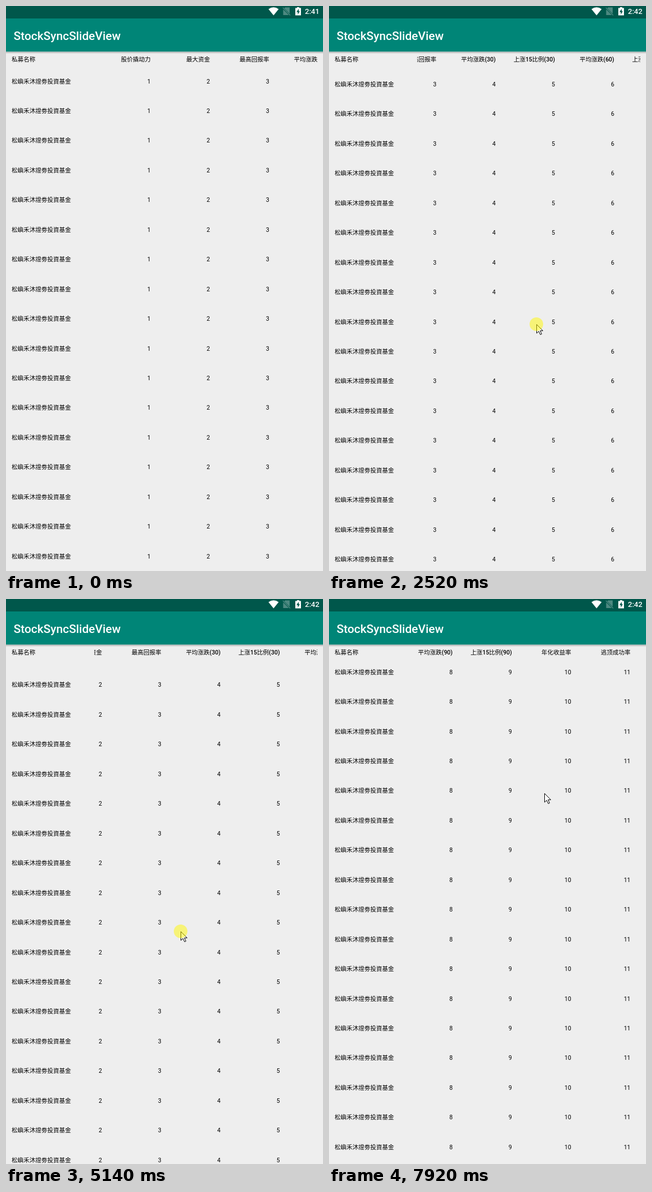
These frames come from a looping animation (561x998 px, 7990 ms). An HTML page:

```html
<!DOCTYPE html>
<html lang="zh-CN">
<head>
<meta charset="utf-8">
<title>StockSyncSlideView</title>
<style>
  html, body { margin: 0; width: 100%; height: 100%; overflow: hidden; background: #eee; }
  svg { display: block; width: 100%; height: 100%; }
  text { font: 10.5px Roboto, "Noto Sans CJK SC", sans-serif; fill: #000; }
  .label { font-weight: 500; }
  .end { text-anchor: end; }
  .title { font-size: 20.8px; font-weight: 500; fill: #fff; }
  .clock { font-size: 13px; font-weight: 500; fill: #fff; }
</style>
</head>
<body>
<svg viewBox="0 0 561 998">
  <defs>
    <linearGradient id="shade" x2="0" y2="1">
      <stop offset="0" stop-opacity=".28"/>
      <stop offset="1" stop-opacity="0"/>
    </linearGradient>
    <clipPath id="listClip"><rect y="106" width="561" height="892"/></clipPath>
    <clipPath id="slideClip"><rect x="156" y="82" width="395" height="916"/></clipPath>
  </defs>
  <rect width="561" height="998" fill="#eee"/>

  <text class="label" x="10" y="98">私募名称</text>
  <g clip-path="url(#slideClip)">
    <g id="heads"></g>
    <g clip-path="url(#listClip)"><g id="cells"></g></g>
  </g>
  <g clip-path="url(#listClip)"><g id="names"></g></g>

  <rect y="80.500" width="561" height="4" fill="url(#shade)"/>
  <rect y="22" width="561" height="58.500" fill="#008577"/>
  <rect width="561" height="22" fill="#00574b"/>
  <text class="title" x="13.500" y="60">StockSyncSlideView</text>
  <path d="M464.5 5.5Q473.5 -1 482.5 5.5L473.5 16.5Z" fill="#fff"/>
  <path d="M494 2.5H502V13.5L492.5 4ZM490.5 6V16H500.5Z" fill="#fff" opacity=".3"/>
  <path d="M490 3L503 16.5" stroke="#fff" stroke-width="1.2" opacity=".3"/>
  <path d="M515 2H519V3.5H522V16.5H512V3.5H515Z" fill="#fff"/>
  <path d="M518 5L514 10.8H516.5V15L520 9.2H518Z" fill="#00574b"/>
  <text id="clock" class="clock" x="529" y="14"></text>

  <g id="pointer">
    <path d="M.5 .5V16L4.2 12.6L7 18.5L9.4 17.4L6.7 11.7H11.5Z" fill="#fff" stroke="#000"/>
    <circle id="press" r="12" fill="#fff800" opacity=".5"/>
  </g>
</svg>
<script>
const LOOP = 7990, ROW = 52.45, COL = 104.9, FIRST_RIGHT = 256, BASE = 136.5;
const FUND = '松嶼禾沐證劵投資基金';
const HEADS = ['股价撬动力', '最大资金', '最高回报率',
  ...[30, 60, 90].flatMap(d => [`平均涨跌(${d})`, `上涨15比例(${d})`]),
  '年化收益率', '逃顶成功率', '操作股票数', '盈利股票数', '盈利股票占比', '亏损股票占比'];

// Scroll gestures: [start ms, end ms, offset reached].
const SLIDES = [[1900, 3300, 659.5], [3700, 4520, 191], [5430, 6050, 0],
  [6280, 7210, 1112], [7300, 7920, 771]];
const SCROLLS = [[300, 1060, 159.3], [1610, 1990, 204.3], [3760, 4520, 182.8],
  [4600, 6275, 0], [7300, 7920, 56.4]];

// Places the pointer passes: [ms, x, y].
const STOPS = [[140, 445, 905], [220, 406, 850], [1520, 394, 683], [3300, 349, 480],
  [4520, 289, 556], [6050, 346, 642], [7210, 271, 550], [7920, 381, 343]];

const ease = u => {
  u = Math.min(1, Math.max(0, u));
  return u * u * (3 - 2 * u);
};

const follow = (moves, t, start = 0) => moves.reduce(
  (at, [from, to, goal]) => at + (goal - at) * ease((t - from) / (to - from)), start);

// One coordinate of the pointer, as moves from stop to stop.
const pointerAt = (axis, t) => follow(
  STOPS.slice(1).map((stop, i) => [STOPS[i][0], stop[0], stop[axis]]), t, STOPS[0][axis]);

// The finger goes down just before a gesture and lifts halfway through it.
const isPressed = t => [...SLIDES, ...SCROLLS].some(
  ([from, to]) => t >= from - 80 && t < (from + to) / 2);

function snap(t) {
  if (t < 370) return [220, 140, 0].find(start => t >= start);
  return 370 + 76.9 * Math.floor((t - 355) / 76.9);
}

const $ = id => document.getElementById(id);
const move = (id, x, y) => $(id).setAttribute('transform', `translate(${x} ${y})`);
const show = (id, on) => { $(id).style.display = on ? '' : 'none'; };

function addText(parent, x, y, label, cls) {
  const el = document.createElementNS('http://www.w3.org/2000/svg', 'text');
  el.setAttribute('x', x);
  el.setAttribute('y', y);
  el.setAttribute('class', cls);
  el.textContent = label;
  $(parent).append(el);
}

const right = c => FIRST_RIGHT + c * COL;
HEADS.forEach((label, c) => addText('heads', right(c), 98, label, 'label end'));
for (let r = 0; r < 19; r++) {
  const y = BASE + r * ROW;
  addText('names', 10, y, FUND, 'label');
  HEADS.forEach((_, c) => addText('cells', right(c), y, c + 1, 'end'));
}

function draw(now) {
  const t = snap(now);
  const dx = -follow(SLIDES, t), dy = -(follow(SCROLLS, t) % ROW);
  move('heads', dx, 0);
  move('cells', dx, dy);
  move('names', 0, dy);
  move('pointer', Math.round(pointerAt(1, t)), Math.round(pointerAt(2, t)));
  show('pointer', t >= STOPS[0][0]);
  show('press', isPressed(t));
  $('clock').textContent = t < 1750 ? '2:41' : '2:42';
}

function tick() {
  draw(performance.now() % LOOP);
  requestAnimationFrame(tick);
}
tick();
</script>
</body>
</html>
```
